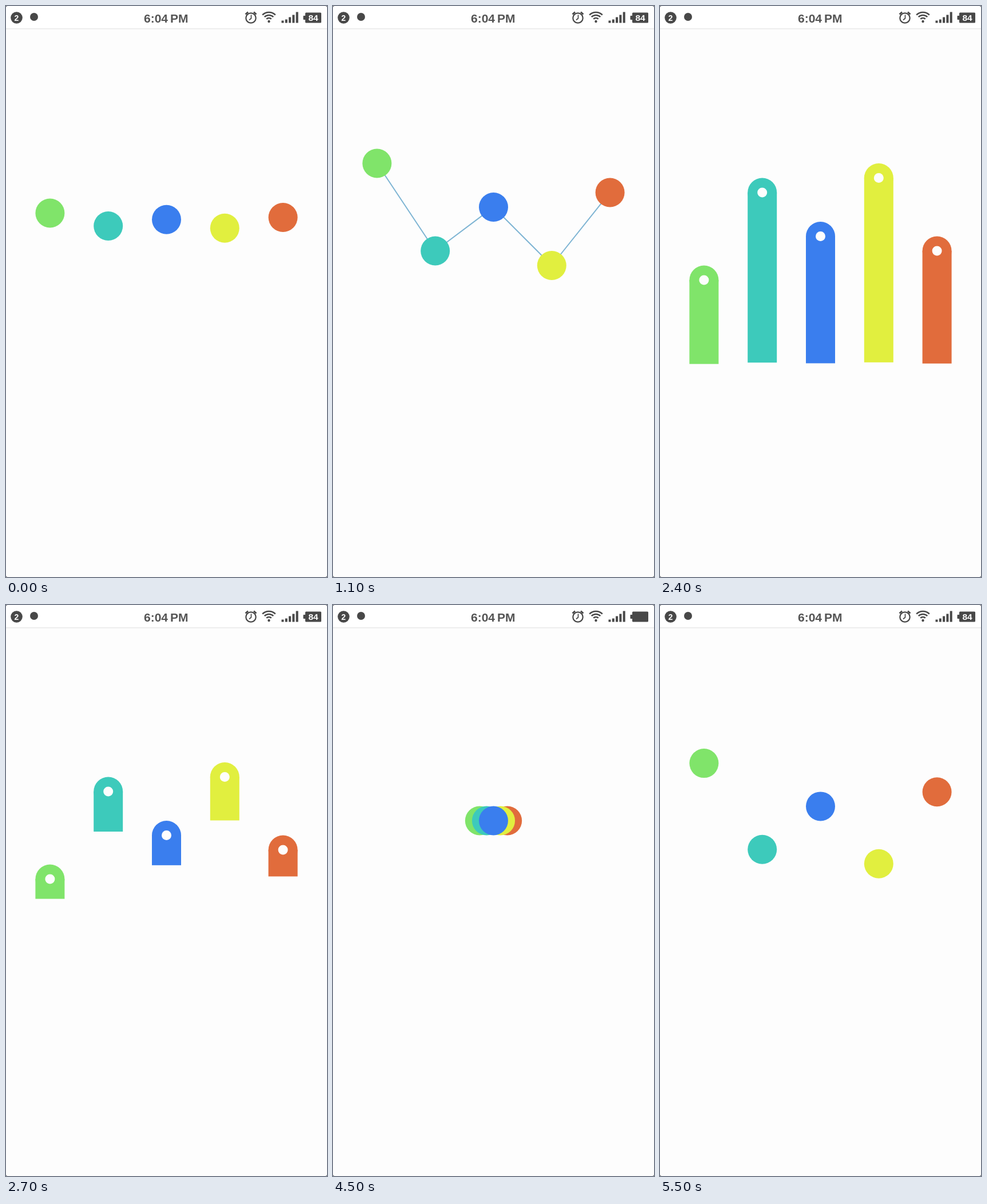
Write an HTML page with a canvas that moves like this. It is 561 px wide and 998 px high and loops after 5.6 s.

```html
<!DOCTYPE html>
<html lang="en">
<head>
<meta charset="utf-8">
<title>Chart morph</title>
<style>
  html, body { margin: 0; width: 100%; height: 100%; overflow: hidden; background: #fdfdfd; }
  canvas { display: block; width: 561px; height: 998px; }
</style>
</head>
<body>
<canvas id="stage" width="561" height="998"></canvas>
<script>
const ctx = document.getElementById('stage').getContext('2d');
const W = 561, H = 998, LOOP = 5600, STEP = 100;
const CX = 280.5, CY = 377, GAP = 101.8, UNIT = 25.5, R = 25.5;
const PIE_R = 67.5, BASE = 628, PAPER = '#fdfdfd', INK = '#484848';
const BLUE = '#3a7eee', YELLOW = '#e1ef3f';

const dots = [
  { col: -2, level: -4, color: '#80e46a' },
  { col: -1, level: 2, color: '#3dcabb' },
  { col: 0, level: -1, color: BLUE },
  { col: 1, level: 3, color: YELLOW },
  { col: 2, level: -2, color: '#e16c3c' }
];
const stack = [0, 4, 1, 3, 2];

// Each track lists [time, value] keys, eased with a half cosine.
const tracks = {
  rise: [[-125, 0], [375, 1], [1535, 1], [2035, 0], [2200, -1], [2915, -1], [3200, 0], [5040, 0], [5540, 1]],
  line: [[375, 0], [875, 1], [1035, 1], [1535, 0]],
  bar: [[2200, 0], [2360, 1], [2860, 0]],
  spread: [[3200, 1], [3360, 0], [4388, 0], [4888, 1]],
  pie: [[3360, 0], [3500, 1], [3888, 1], [4388, 0]],
  pop: [[3500, 0], [3700, 1], [3888, 0]]
};

function track(keys, t) {
  if (t <= keys[0][0]) return keys[0][1];
  for (let i = 1; i < keys.length; i++) {
    const [a, from] = keys[i - 1], [b, to] = keys[i];
    if (t < b) return from + (to - from) * (1 - Math.cos(Math.PI * (t - a) / (b - a))) / 2;
  }
  return keys[keys.length - 1][1];
}

function disc(x, y, r, color) {
  ctx.fillStyle = color;
  ctx.beginPath();
  ctx.arc(x, y, r, 0, Math.PI * 2);
  ctx.fill();
}

function sector(x, y, r, from, to, color) {
  ctx.fillStyle = color;
  ctx.beginPath();
  ctx.moveTo(x, y);
  ctx.arc(x, y, r, from, to);
  ctx.closePath();
  ctx.fill();
}

function stroke(color, width, ...points) {
  ctx.strokeStyle = color;
  ctx.lineWidth = width;
  ctx.beginPath();
  points.forEach(([x, y], i) => i ? ctx.lineTo(x, y) : ctx.moveTo(x, y));
  ctx.stroke();
}

function ring(x, y, r, from, to, width) {
  ctx.strokeStyle = INK;
  ctx.lineWidth = width;
  ctx.beginPath();
  ctx.arc(x, y, r, from, to);
  ctx.stroke();
}

function label(text, x, y, size, color, align = 'left') {
  ctx.font = `bold ${size}px "Liberation Sans", sans-serif`;
  ctx.fillStyle = color;
  ctx.textAlign = align;
  ctx.fillText(text, x, y);
}

function box(x, y, w, h, r = 0) {
  ctx.fillStyle = INK;
  ctx.beginPath();
  ctx.roundRect(x, y, w, h, r);
  ctx.fill();
}

function drawStatus(t) {
  ctx.fillStyle = '#fff';
  ctx.fillRect(0, 0, W, 39);
  ctx.fillStyle = '#e9e9e9';
  ctx.fillRect(0, 39, W, 1.5);

  disc(18.5, 20.5, 10.3, INK);
  label('2', 18.5, 25.5, 14, '#fff', 'center');
  disc(49, 19, 7, INK);

  label('6:04', 241, 28.5, 21, '#555');
  label('PM', 287, 28.5, 21, '#555');

  // Alarm clock
  ring(428, 21, 8.7, 0, Math.PI * 2, 2.2);
  stroke(INK, 1.7, [428.5, 15.5], [428.5, 21.5], [425, 24.5]);
  stroke(INK, 2.6, [418.5, 14.5], [423, 10.5]);
  stroke(INK, 2.6, [433, 10.5], [437.5, 14.5]);

  // Wireless and signal
  disc(459.5, 27, 2.2, INK);
  for (const r of [6, 11, 16]) ring(459.5, 27, r, -Math.PI * 0.75, -Math.PI * 0.25, 2.5);
  [4, 6, 10, 14, 19].forEach((h, i) => box(481.5 + i * 6.3, 29.5 - h, 4, h));

  // Battery
  box(519.5, 17, 4, 7, 1);
  box(523, 11.5, 28, 18, 1.5);
  const phase = t % 2600;
  if (phase < 1500 || phase >= 2300) label('84', 537, 26, 15.5, '#fff', 'center');
}

function drawCorners() {
  ctx.fillStyle = '#555';
  for (const [x, y, sx, sy] of [[0, 0, 1, 1], [W, 0, -1, 1], [0, H, 1, -1], [W, H, -1, -1]]) {
    ctx.beginPath();
    ctx.moveTo(x, y);
    ctx.lineTo(x + 3 * sx, y);
    ctx.quadraticCurveTo(x, y, x, y + 3 * sy);
    ctx.fill();
  }
}

function drawPie(pie, pop) {
  const r = R + (PIE_R - R) * pie, wedge = Math.PI / 3;
  if (!pop) return disc(CX, CY, r, BLUE);
  sector(CX, CY, r, 0, Math.PI * 2 - wedge, BLUE);
  const out = 15 * pop;
  sector(CX + out * Math.cos(wedge / 2), CY - out * Math.sin(wedge / 2), r, -wedge, 0, YELLOW);
}

function drawDots(s) {
  const at = dots.map(d => [CX + d.col * GAP * s.spread, CY + d.level * UNIT * s.rise]);

  if (s.line > 0) {
    for (let i = 1; i < at.length; i++) {
      const [x, y] = at[i - 1], [nx, ny] = at[i];
      stroke('#7db4d3', 2, [x, y], [x + (nx - x) * s.line, y + (ny - y) * s.line]);
    }
  }
  for (const i of stack) {
    const [x, y] = at[i];
    disc(x, y, R, dots[i].color);
    if (s.bar > 0) {
      ctx.fillRect(x - R, y, R * 2, (BASE - y) * s.bar);
      disc(x, y, R / 3, PAPER);
    }
  }
}

function draw(t) {
  const s = {};
  for (const name in tracks) s[name] = track(tracks[name], t);
  ctx.fillStyle = PAPER;
  ctx.fillRect(0, 0, W, H);
  drawStatus(t);
  if (s.pie > 0) drawPie(s.pie, s.pop);
  else drawDots(s);
  drawCorners();
}

const start = performance.now();
function tick() {
  const t = Math.max(0, performance.now() - start) % LOOP;
  draw(Math.floor(t / STEP) * STEP);
  requestAnimationFrame(tick);
}
tick();
</script>
</body>
</html>
```
